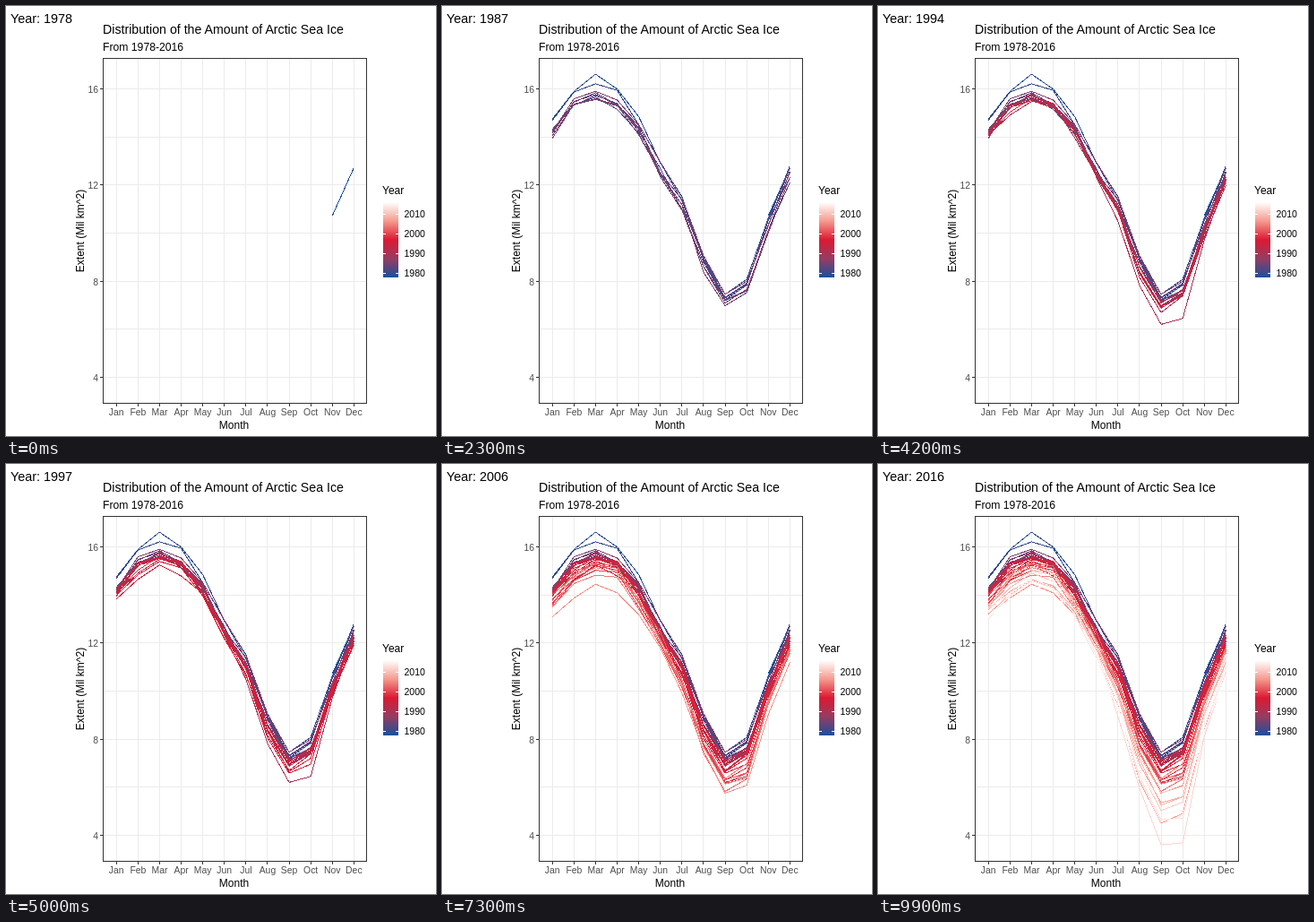
These frames come from a looping animation (480 px wide and 480 px high, 10000 ms). An HTML page:

```html
<!DOCTYPE html>
<html lang="en">
<head>
<meta charset="utf-8">
<title>Arctic Sea Ice</title>
<style>
html, body { margin: 0; width: 100%; height: 100%; overflow: hidden; background: #fff; }
svg { display: block; width: 480px; height: 480px; font-family: "Liberation Sans", Arial, sans-serif; }
.crisp { shape-rendering: crispEdges; fill: none; }
</style>
</head>
<body>
<svg id="stage" viewBox="0 0 480 480"></svg>
<script>
const FIRST = 1978, SPAN = 38, STEPS = 100, STEP_MS = 100;
const PANEL = { left: 108.5, top: 58.5, right: 402.5, bottom: 443.5 };
const MONTHS = ["Jan", "Feb", "Mar", "Apr", "May", "Jun", "Jul", "Aug", "Sep", "Oct", "Nov", "Dec"];

// The yearly curve at the start, and how strongly each month follows the September melt.
const CURVE = [14.4, 15.55, 16, 15.65, 14.5, 12.8, 11.3, 8.85, 7.4, 8, 10.5, 12.6];
const MELT = [0.06, 0.02, 0, 0, 0.08, 0.2, 0.58, 0.8, 1, 1.1, 0.62, 0.35];

// March and September extents of the years that stand out.
const LANDMARKS = {
  1978: [16, 7.76], 1979: [16.62, 7.22], 1990: [15.8, 6.2],
  2006: [14.45, 5.75], 2007: [14.65, 4.5], 2012: [15.2, 3.6]
};

const RAMP = [[26, 79, 154], [150, 60, 98], [220, 25, 50], [245, 155, 143], [255, 255, 255]];

const stage = document.getElementById("stage");
const px = month => 123.24 + 24.1 * month;
const py = extent => 414.4 - (extent - 4) * 26.81;
const rgb = c => `rgb(${c.map(Math.round)})`;

function add(tag, attrs, parent = stage) {
  const el = document.createElementNS("http://www.w3.org/2000/svg", tag);
  for (const key in attrs) el.setAttribute(key, attrs[key]);
  parent.appendChild(el);
  return el;
}

function text(str, x, y, size, fill = "#000", anchor = "start", extra = {}) {
  const el = add("text", { x, y, "font-size": size, fill, "text-anchor": anchor, ...extra });
  el.textContent = str;
  return el;
}

function line(x1, y1, x2, y2, stroke) {
  add("line", { x1, y1, x2, y2, stroke, class: "crisp" });
}

function rampColor(t) {
  const pos = t * (RAMP.length - 1), i = Math.min(Math.floor(pos), RAMP.length - 2);
  return rgb(RAMP[i].map((v, c) => v + (RAMP[i + 1][c] - v) * (pos - i)));
}

// Repeatable noise from -1 to 1.
function noise(a, b) {
  const n = Math.sin(a * 127.1 + b * 311.7) * 43758.5;
  return 2 * (n - Math.floor(n)) - 1;
}

// Winters shrink steadily, summers ever faster.
function extremes(k) {
  const t = k / SPAN;
  return LANDMARKS[FIRST + k] || [
    16.05 - 1.5 * t + 0.25 * noise(k, 20),
    7.3 - 2.6 * t ** 2.2 + (0.25 + 0.35 * t) * noise(k, 30)
  ];
}

function extent(k, m) {
  const [march, sept] = extremes(k);
  if (m === 2) return march;
  if (m === 8) return sept;
  const winter = Math.cos(Math.PI * (m - 2) / 12) ** 2;
  const jitter = k ? 0.22 * noise(k, m) : 0;
  const shift = winter * (march - CURVE[2]) + MELT[m] * (sept - CURVE[8]) + jitter;
  return CURVE[m] + Math.min(0.35, shift);
}

function drawGrid() {
  for (let v = 4; v <= 16; v += 2) {
    const y = Math.floor(py(v)) + 0.5;
    line(PANEL.left, y, PANEL.right, y, "#ebebeb");
    if (v % 4) continue;
    line(105, y, 108, y, "#333");
    text(v, 103, y + 4, 10.4, "#4d4d4d", "end");
  }
  MONTHS.forEach((name, m) => {
    const x = Math.floor(px(m)) + 0.5;
    line(x, PANEL.top, x, PANEL.bottom, "#ebebeb");
    line(x, 444, x, 447, "#333");
    text(name, px(m), 457, 10.4, "#4d4d4d", "middle");
  });
}

function drawYears() {
  return Array.from({ length: SPAN + 1 }, (_, k) => {
    const points = MONTHS.map((_, m) => `${px(m)},${py(extent(k, m)).toFixed(1)}`);
    const el = add("polyline", {
      // Records begin in November of the first year.
      points: points.slice(k ? 0 : 10).join(" "), stroke: rampColor(k / SPAN), class: "crisp"
    });
    return { el, start: Math.round(k * (STEPS - 1) / SPAN) };
  });
}

function drawLegend() {
  const grad = add("linearGradient", { id: "ramp", x1: 0, y1: 1, x2: 0, y2: 0 });
  RAMP.forEach((c, i) => add("stop", { offset: i / (RAMP.length - 1), "stop-color": rgb(c) }, grad));
  text("Year", 420, 210, 12);
  add("rect", { x: 421, y: 219, width: 17, height: 84, fill: "url(#ramp)" });
  for (let year = 1980; year <= 2010; year += 10) {
    const y = Math.floor(303 - 84 * (year - FIRST) / SPAN) + 0.5;
    line(421, y, 424, y, "#fff");
    line(435, y, 438, y, "#fff");
    text(year, 444.5, y + 3.5, 10.5);
  }
}

drawGrid();
const years = drawYears();
add("rect", {
  x: PANEL.left, y: PANEL.top, width: PANEL.right - PANEL.left,
  height: PANEL.bottom - PANEL.top, stroke: "#333", class: "crisp"
});
text("Distribution of the Amount of Arctic Sea Ice", 108, 31, 14.2);
text("From 1978-2016", 108, 50, 12.2);
text("Month", 254.5, 472, 12, "#000", "middle");
text("Extent (Mil km^2)", 0, 0, 12, "#000", "middle", { transform: "translate(86.5 251) rotate(-90)" });
drawLegend();
const label = text("", 5, 19, 14.4);

function render(now) {
  const step = Math.floor(now / STEP_MS) % STEPS;
  label.textContent = "Year: " + (FIRST + Math.round(SPAN * step / (STEPS - 1)));
  for (const { el, start } of years) el.style.display = step >= start ? "" : "none";
}

const begin = performance.now();
function tick() {
  render(performance.now() - begin);
  requestAnimationFrame(tick);
}
tick();
</script>
</body>
</html>
```
